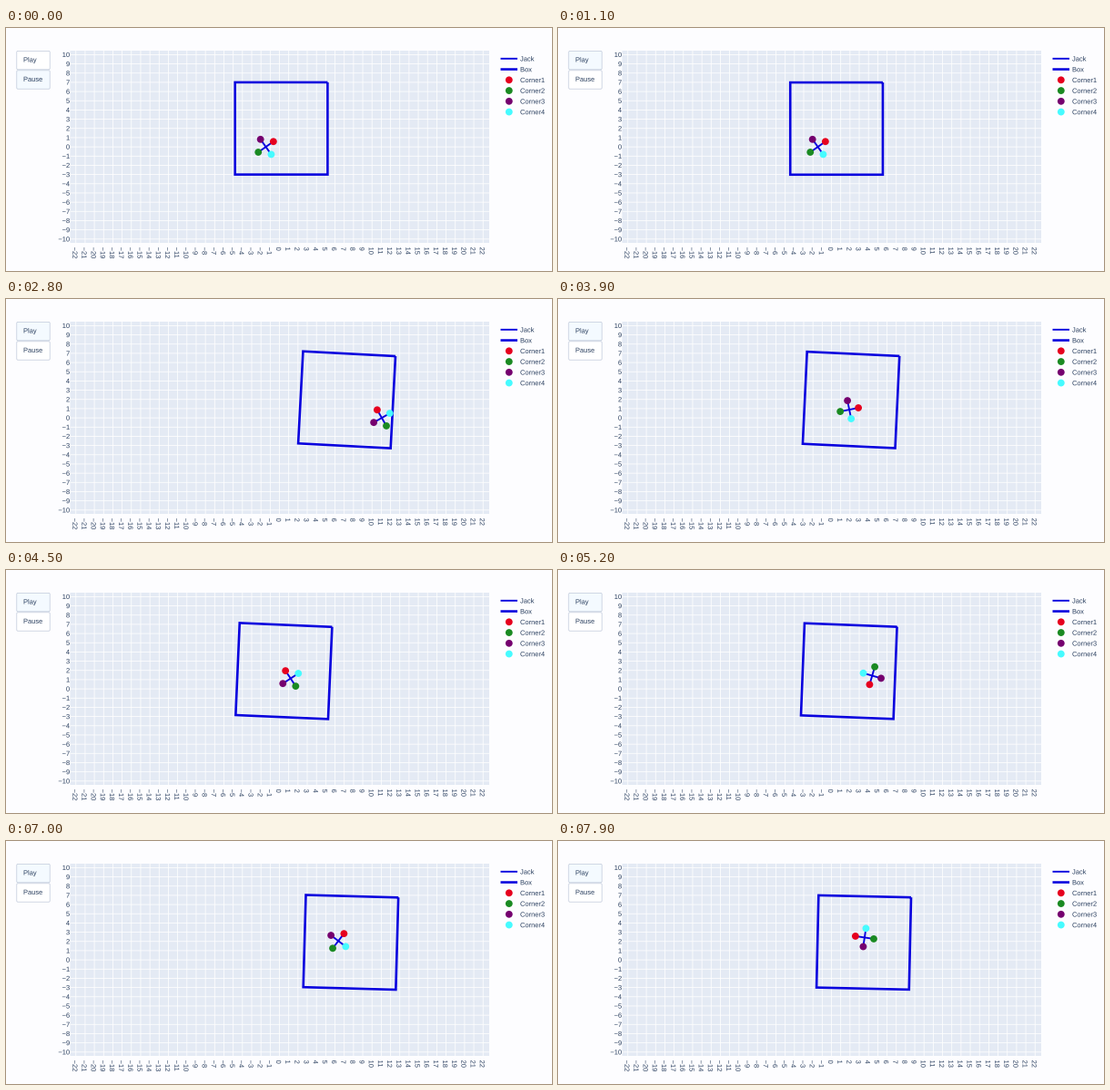
These frames come from a looping animation (600x268 px, 8000 ms). A matplotlib script:

```python
import numpy as np
import matplotlib.pyplot as plt
from matplotlib.animation import FuncAnimation
from matplotlib.patches import Circle, FancyBboxPatch, PathPatch, Rectangle
from matplotlib.textpath import TextPath
from matplotlib.transforms import Affine2D

W, H, DPI = 600, 268, 100
FRAMES, STEP = 80, 100
PT = 72 / DPI                       # points per pixel
X0, Y0, UNIT = 300.5, 131.1, 10.17  # data origin and scale in pixels
FONT = 7.5
CLICK = 0.5                         # seconds until Play is pressed
INK, BLUE = "#2a3f5f", "#0800de"
CORNERS = [("Corner1", "#e6001e", 0), ("Corner2", "#1a8a22", 180),
           ("Corner3", "#75006f", 90), ("Corner4", "#46fbff", 270)]

# Motion in seconds, axis units and degrees
TURNS = [(0.9, 0.2), (2.37, 7.95), (4.6, 0.44), (6.69, 8.1), (8.84, 0.4)]
TILT = [(1.12, 0), (2.83, -3.06), (7.9, -1.27)]
SPIN = [(1.18, 35.3), (2.0, 249), (2.8, 479.8), (3.9, 731.5),
        (5.2, 973.8), (6.1, 1013.7), (7.9, 1251.5)]
LAUNCH = (1.18, -1.47, 0.0)         # time and place where the jack takes off
HITS = [2.83, 3.6, 4.27, 4.79, 5.31, 5.87, 6.37, 6.84, 7.29, 7.68, 8.115]
REACH = 4.1                         # box center to jack center at a hit
CLIMB = 1.55                        # rise per tilt and distance flying left

plt.rcParams.update({"font.family": "Liberation Sans", "path.snap": False})


def linear(keys, t):
    return np.interp(t, *zip(*keys))


def box_x(t):
    """Swing between the turning points with cosine easing."""
    t = max(t, TURNS[0][0])
    for (ta, a), (tb, b) in zip(TURNS, TURNS[1:]):
        if t <= tb:
            return a + (b - a) * (1 - np.cos(np.pi * (t - ta) / (tb - ta))) / 2


def box_y(t):
    return 2 - 0.014 * t


def bounce_path():
    """Bounce off right and left wall in turn; a tilted wall sends the jack up."""
    path, side = [LAUNCH], 1
    for t in HITS:
        _, last_x, y = path[-1]
        x = box_x(t) + side * REACH
        if side < 0:
            y -= CLIMB * np.radians(linear(TILT, t)) * (last_x - x)
        path.append((t, x, y))
        side = -side
    return np.array(path).T


JACK_T, JACK_X, JACK_Y = bounce_path()


def to_px(z):
    return X0 + UNIT * z.real, Y0 - UNIT * z.imag


def turned(deg):
    return np.exp(1j * np.radians(deg))


fig = plt.figure(figsize=(W / DPI, H / DPI), dpi=DPI, facecolor="#fdfdff")
ax = fig.add_axes([0, 0, 1, 1])
ax.set(xlim=(0, W), ylim=(H, 0))
ax.axis("off")


def line(xs, ys, width, color=BLUE, z=3):
    return ax.plot(xs, ys, color=color, lw=width * PT, zorder=z,
                   solid_capstyle="butt", solid_joinstyle="miter")[0]


def label(x, y, text, right=False, rotation=0):
    """Text on a baseline at x, y, drawn at subpixel position."""
    path = TextPath((0, 0), text, size=FONT)
    shift = -path.get_extents().x1 if right else 0
    place = (Affine2D().translate(shift, 0).scale(1, -1)
             .rotate_deg(rotation).translate(x, y))
    ax.add_patch(PathPatch(place.transform_path(path), fc=INK, lw=0, zorder=4))


def dot(x, y, color):
    return ax.add_patch(Circle((x, y), 3.9, fc=color, lw=0, zorder=5))


def button(y, text):
    label(19, y + 12.1, text)
    return ax.add_patch(FancyBboxPatch(
        (11.8, y), 36.4, 20.4, boxstyle="round,pad=0,rounding_size=1.2",
        ec="#bec8d9", lw=0.7 * PT, zorder=3))


def tick(n):
    return str(n).replace("-", "\u2212")


# Plot area, grid and ticks
LEFT, TOP, RIGHT, BOTTOM = 70.5, 25, 531, 237
ax.add_patch(Rectangle((LEFT, TOP), RIGHT - LEFT, BOTTOM - TOP,
                       fc="#e4eaf4", lw=0, zorder=1))
for n in range(-22, 23):
    x = X0 + UNIT * n
    line([x, x], [TOP, BOTTOM], 0.8, "white", 2)
    label(x - 3.5, 241.6, tick(n), rotation=90)
for n in range(-10, 11):
    y = Y0 - UNIT * n
    line([LEFT, RIGHT], [y, y], 0.8, "white", 2)
    label(69.8, y + 2.6, tick(n), right=True)

# Buttons and legend
play, pause = button(25.4, "Play"), button(46.8, "Pause")
for k, name in enumerate(["Jack", "Box"] + [c[0] for c in CORNERS]):
    y = 33.8 + 11.75 * k
    label(565, y + 2.7, name)
    if k < 2:
        line([543.5, 562], [y, y], 1.9 + 0.7 * k)
    else:
        dot(552.8, y, CORNERS[k - 2][1])

# Moving parts
arms = [line([], [], 1.9) for _ in range(2)]
box = line([], [], 2.6, z=4)
dots = [dot(0, 0, color) for _, color, _ in CORNERS]
SQUARE = 5 * np.array([1 + 1j, -1 + 1j, -1 - 1j, 1 - 1j, 1 + 1j])
ANGLES = np.array([angle for _, _, angle in CORNERS])


def draw(frame):
    t = frame * STEP / 1000
    playing = t >= CLICK
    play.set_facecolor("#f4faff" if playing else "white")
    pause.set_facecolor("white" if playing else "#f4faff")

    center = box_x(t) + 1j * box_y(t)
    box.set_data(*to_px(center + SQUARE * turned(linear(TILT, t))))

    hub = np.interp(t, JACK_T, JACK_X) + 1j * np.interp(t, JACK_T, JACK_Y)
    xs, ys = to_px(hub + turned(linear(SPIN, t) + ANGLES))
    for d, x, y in zip(dots, xs, ys):
        d.center = x, y
    for k, arm in enumerate(arms):
        arm.set_data(xs[2 * k:2 * k + 2], ys[2 * k:2 * k + 2])
    return [box, play, pause, *arms, *dots]


anim = FuncAnimation(fig, draw, frames=FRAMES, interval=STEP,
                     repeat=True, repeat_delay=0)
plt.show()
```
